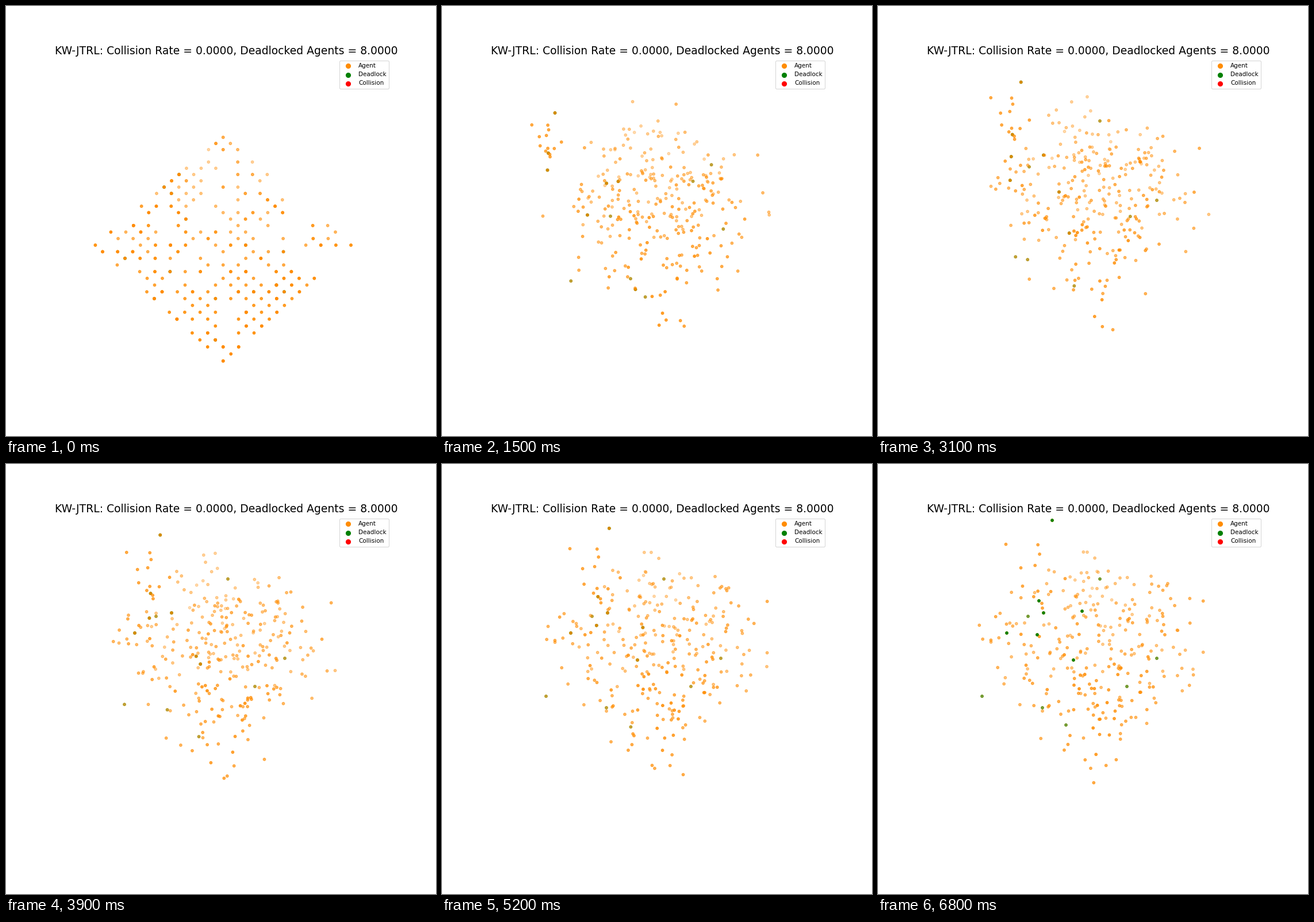
Animation, 748 px wide and 748 px high, one loop 6900 ms. Source, as a matplotlib script:

```python
import numpy as np
import matplotlib.pyplot as plt
from matplotlib.animation import FuncAnimation
from matplotlib.colors import to_rgba

SIZE, FRAMES, STEP = 748, 69, 100
SIDE, FREE, SWARM = 17, 274, 15
rng = np.random.default_rng(11)

# Resting places of the deadlocked agents: in the swarm, near, far.
SWARM_ENDS = [(303, 98), (280, 238), (277, 297)]
NEAR_ENDS = [(288, 259), (224, 294), (355, 256), (340, 341)]
FAR_ENDS = [(261, 265), (386, 200), (485, 338), (433, 387),
            (181, 404), (286, 424), (327, 454)]


def floor(uv):
    """Project points of the unit floor to pixels."""
    u, v = uv.T
    w = 1 + 0.0373 * (u + v)
    return np.stack([377.7 + 230.6 * (u - v) / w,
                     (617.5 - 186 * (u + v)) / w], -1)


def glide(a, b, bend, arrive, t):
    """Bent path from a to b that slows down on arrival."""
    p = 1 - (1 - np.clip(t / arrive, 0, 1)) ** 1.5
    p = p[:, None]
    return a + (b - a) * p + bend * np.sin(np.pi * p)


def tint(color, alpha):
    rgba = np.tile(to_rgba(color), (len(alpha), 1))
    rgba[:, 3] = alpha
    return rgba


def pick(cells, n):
    return cells[rng.integers(len(cells), size=n)]


# Start cells: the far tip and the corners are always taken.
grid = np.stack(np.meshgrid(range(SIDE + 1), range(SIDE + 1)), -1).reshape(-1, 2)
total = grid.sum(1)
corner = np.all(grid % SIDE == 0, axis=1)
tips = grid[corner | (total > 31)] / SIDE
cells = grid[total != 31] / SIDE

# Free agents: floor start, floor goal and a height in pixels.
starts = np.vstack([tips, pick(cells, FREE - len(tips))])
goals = rng.uniform(0.02, 0.98, (FREE, 2))
lift = rng.uniform(25, 220 - 50 * goals.sum(1))
bends = rng.normal(0, 0.14, (FREE, 2))
arrive = rng.uniform(2.5, 8, FREE)

# Deadlocked agents outside the swarm move in pixels.
ends = np.array(NEAR_ENDS + FAR_ENDS)
end_starts = floor(pick(cells, len(ends)))
end_bends = rng.normal(0, 30, (len(ends), 2))
end_arrive = rng.uniform(2.5, 6.5, len(ends))

# The swarm climbs the left side; its first members end up deadlocked.
SWARM_GOAL = (280, 190)
swarm_starts = floor(pick(cells[cells[:, 0] - cells[:, 1] < -0.3], SWARM))
spread = rng.normal(0, (20, 40), (SWARM, 2))
spread[:len(SWARM_ENDS)] = np.subtract(SWARM_ENDS, SWARM_GOAL)

near = len(SWARM_ENDS) + len(NEAR_ENDS)
stuck = near + len(FAR_ENDS)
green_alpha = np.where(np.arange(stuck) < near, 0.9, 0.5)
led_alpha = np.append(np.where(np.arange(stuck) < near, 0.8, 0.5),
                      np.full(SWARM - len(SWARM_ENDS), 0.72))


def roam(t):
    uv = np.clip(glide(starts, goals, bends, arrive, t), 0, 1)
    rise = lift * (1 - np.exp(-t))
    pos = floor(uv)
    pos[:, 1] -= rise
    depth = 200 * uv.sum(1) - rise
    front = depth.min() - 120 * min(1, t / 1.5)
    return pos, 1 - 0.7 * (depth - front) / (depth.max() - front)


def climb(t):
    q = max(0, (t - 1.5) / 5.3)
    x0, y0 = SWARM_GOAL
    path = np.array([x0 - 95 * (1 - q) ** 2, y0 + 42 * (1 - q) ** 8])
    pos = path + spread * (0.5 + 0.5 * q)
    return swarm_starts + (pos - swarm_starts) * min(1, t / 1.5)


fig = plt.figure(figsize=(10, 10), dpi=SIZE / 10)
stage = fig.add_axes([0, 0, 1, 1])
stage.set(xlim=(0, SIZE), ylim=(SIZE, 0))
stage.axis("off")
green = stage.scatter([], [], s=20, color="green", zorder=1)
orange = stage.scatter([], [], s=20, color="darkorange", zorder=2)

ax = fig.add_subplot(box_aspect=1)
ax.axis("off")
ax.set_title("KW-JTRL: Collision Rate = 0.0000, Deadlocked Agents = 8.0000",
             fontsize=18)
for name, color in (("Agent", "darkorange"), ("Deadlock", "green"),
                    ("Collision", "red")):
    ax.scatter([], [], s=60, color=color, label=name)
ax.legend(loc="upper right")


def draw(i):
    t = i * STEP / 1000
    free, free_alpha = roam(t)
    swarm = climb(t)
    loners = glide(end_starts, ends, end_bends, end_arrive, t)
    k = len(SWARM_ENDS)
    led = np.vstack([swarm[:k], loners, swarm[k:]])
    cover = 1 - (1 - led_alpha) * min(1, t / 0.5)

    alpha = np.append(free_alpha, cover)
    order = np.argsort(alpha)
    orange.set_offsets(np.vstack([free, led])[order])
    orange.set_color(tint("darkorange", alpha[order]))
    green.set_offsets(led[:stuck])
    green.set_color(tint("green", green_alpha))
    # Deadlocks come to the front once the run is over.
    green.set_zorder(3 if i == FRAMES - 1 else 1)
    return green, orange


anim = FuncAnimation(fig, draw, frames=FRAMES, interval=STEP,
                     repeat=True, repeat_delay=0, blit=False)
plt.show()
```
